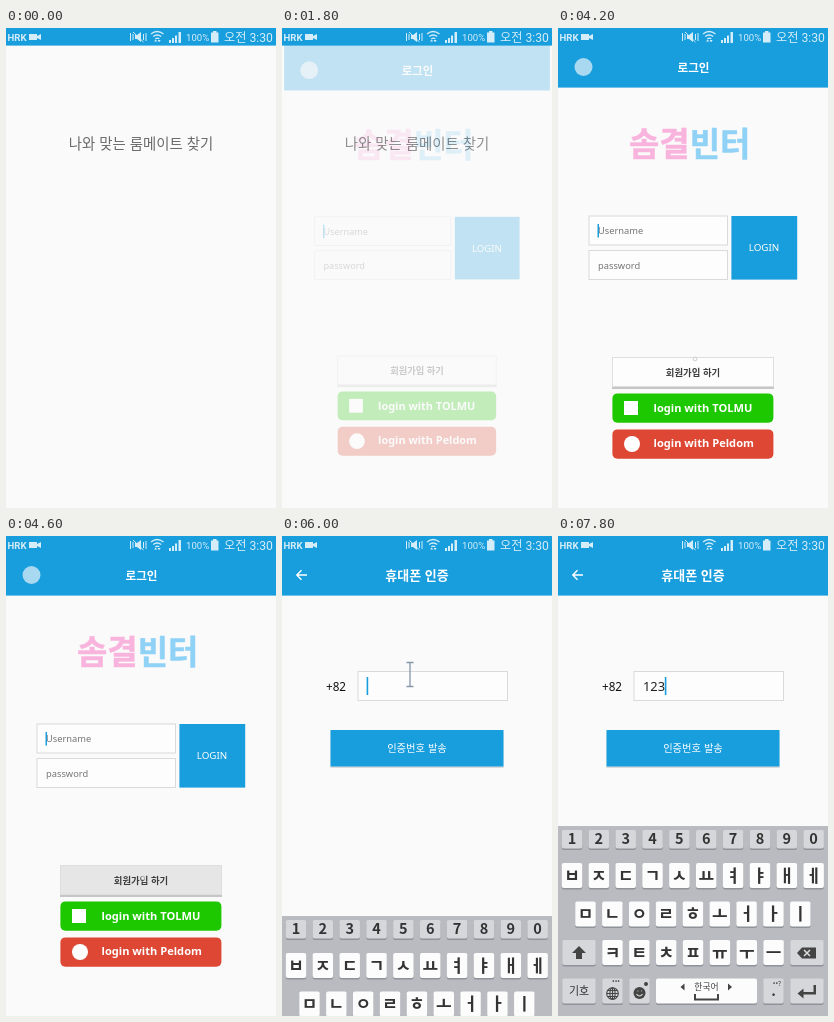
Write an HTML page that moves like this. It is 270 px wide and 480 px high and loops after 8000 ms.

```html
<!DOCTYPE html>
<html lang="ko">
<head>
<meta charset="utf-8">
<title>Login flow</title>
<style>
html, body { margin: 0; width: 100%; height: 100%; overflow: hidden; background: #fafafa; }
svg { display: block; width: 100vw; height: 100vh; }
text { font-family: "Noto Sans", "Noto Sans CJK KR", "Noto Sans CJK", sans-serif; }
.ko { font-family: "Noto Sans CJK KR", "Noto Sans CJK", sans-serif; }
.status text { font-family: Roboto, "Noto Sans CJK KR", "Noto Sans CJK", sans-serif; }
.mid { text-anchor: middle; }
.medium { font-weight: 500; }
.bold { font-weight: 700; }
.white { fill: #fff; }
.blue { fill: #189ddd; }
.hint { fill: #757575; font-size: 9.3px; }
.field { fill: #fdfdfd; stroke: #dadada; }
.mark { font-size: 33px; font-weight: 900; stroke-width: .5; stroke-linejoin: round; }
.line { fill: none; stroke: #fff; }
</style>
</head>
<body>
<svg viewBox="0 0 270 480" preserveAspectRatio="none">
  <rect width="270" height="480" fill="#fafafa"/>
  <text class="ko mid medium" x="135" y="120.5" font-size="14.4" fill="#6a6a6a">나와 맞는 룸메이트 찾기</text>

  <g id="login">
    <rect width="270" height="480" fill="#fafafa"/>
    <rect class="blue" width="270" height="59.6"/>
    <circle cx="25.5" cy="39" r="9" fill="#a9d8f1"/>
    <text class="ko mid bold white" x="135.5" y="43.5" font-size="11.6">로그인</text>
    <text class="ko mark" x="71" y="127.5" fill="#f9b4de" stroke="#f9b4de">솜결<tspan fill="#90d2f6" stroke="#90d2f6">빈터</tspan></text>
    <rect class="field" x="31" y="188" width="138.5" height="29"/>
    <rect class="field" x="31" y="222.5" width="138.5" height="29"/>
    <text class="hint" x="40" y="206.3">Username</text>
    <text class="hint" x="40" y="240.8">password</text>
    <rect id="loginCaret" class="blue" x="39.5" y="196" width="1.5" height="13.5"/>
    <rect class="blue" x="173.4" y="188" width="65.8" height="63.6"/>
    <text class="mid white" x="206" y="223.3" font-size="9.8">LOGIN</text>
    <rect x="54" y="357" width="162" height="4" fill="#c6c6c6"/>
    <rect id="signUp" x="54.5" y="329.5" width="161" height="29" fill="#fdfdfd" stroke="#dedede"/>
    <text class="ko mid bold" x="135" y="347.7" font-size="9.4" fill="#3c3c3c">회원가입 하기</text>
    <rect x="54.4" y="365.4" width="161" height="29.4" rx="5" fill="#1ec800"/>
    <rect class="white" x="66" y="373" width="14" height="14"/>
    <text class="bold white" x="95.5" y="383.8" font-size="11.1">login with TOLMU</text>
    <rect x="54.4" y="401.4" width="161" height="29.4" rx="5" fill="#dd4733"/>
    <circle class="white" cx="74" cy="416" r="8"/>
    <text class="bold white" x="95.5" y="419.3" font-size="11.1">login with Peldom</text>
  </g>

  <g id="phone">
    <rect width="270" height="480" fill="#fafafa"/>
    <rect class="blue" width="270" height="59.6"/>
    <path class="line" stroke-width="1.4" d="M25 39H15M19.5 34.3L14.8 39L19.5 43.7"/>
    <text class="ko mid bold white" x="135" y="44" font-size="13">휴대폰 인증</text>
    <text x="44" y="154.5" font-size="11.7" fill="#111">+82</text>
    <rect class="field" x="76" y="135.5" width="149.5" height="29"/>
    <text id="digits" x="85" y="155" font-size="12.9" fill="#222"></text>
    <rect id="phoneCaret" class="blue" y="141" width="1.6" height="18"/>
    <rect x="48.5" y="196" width="173" height="36" fill="#000" opacity=".13"/>
    <rect class="blue" x="48.5" y="194" width="173" height="36.5"/>
    <text class="ko mid medium white" x="135" y="216" font-size="10.3">인증번호 발송</text>
  </g>

  <g id="keyboard"></g>

  <rect class="blue" width="270" height="17.6"/>
  <g class="status" opacity=".82">
    <text class="bold white" x="1.5" y="12.6" font-size="9.6">HRK</text>
    <path class="white" d="M23 6h8v2l4-2v6l-4-2v2h-8z"/>
    <path class="line" d="M124.5 5v8M127 6v6M137.5 6v6M140 5v8M127 4l10.5 10"/>
    <path class="white" d="M129 7h2l4-3v10l-4-3h-2z"/>
    <path class="line" stroke-width="1.3" d="M145 6q6-5 12.5 0M147.2 8.5q4-3 8 0M149.3 10.8q2-1.5 4 0"/>
    <path class="white" d="M148 13.5l1.6-2 1.6 2zM151.5 12l1.6 2.2 1.6-2.2z"/>
    <path class="white" d="M163 12h2v3h-2zM166 10h2v5h-2zM169 7.5h2v7.5h-2zM172.5 4h2.5v11h-2.5z"/>
    <text class="white" x="180" y="12.7" font-size="9.6">100%</text>
    <path class="white" d="M205 4.5h2v-1.5h3.5v1.5h2v10h-7.5z"/>
    <text class="white" x="218" y="13.5" font-size="12.2">오전 3:30</text>
  </g>

  <circle id="dot" r="1.9" fill="#fff" fill-opacity=".7" stroke="#bbb" stroke-width=".7"/>
  <path id="beam" d="M124.5 126.5h7M124.5 150.5h7M128 126.5v24" fill="none" stroke="#8797aa" stroke-width="1.3"/>
</svg>
<script>
const $ = id => document.getElementById(id);
const show = (id, on) => $(id).setAttribute('display', on ? 'inline' : 'none');
const set = (id, attrs) => Object.entries(attrs).forEach(([k, v]) => $(id).setAttribute(k, v));

// Keyboard
const PITCH = 26.85, PALE = '#d5d7da', LIGHT = '#fcfcfc';

function key(cx, y, w, h, fill, label = '', size = 16, id = '') {
  const box = `x="${cx - w / 2}" width="${w}" height="${h}" rx="2"`;
  return `<rect ${box} y="${y + 1.5}" fill="#8f9299"/>
    <rect ${box} y="${y}" fill="${fill}" ${id && `id="${id}"`}/>
    <text class="ko mid" x="${cx}" y="${y + h / 2 + size * .36}" font-size="${size}"
      font-weight="${size > 12 ? 700 : 400}" fill="#333">${label}</text>`;
}
const row = (chars, x, y, h, fill, size, prefix) => [...chars].map((c, i) =>
  key(x + i * PITCH, y, 20.5, h, fill, c, size, prefix ? prefix + c : '')).join('');

$('keyboard').innerHTML = `
  <rect y="290" width="270" height="190" fill="#b9bbc1"/>
  ${row('1234567890', 14, 294, 18.5, PALE, 14.5, 'key')}
  ${row('ㅂㅈㄷㄱㅅㅛㅕㅑㅐㅔ', 14, 327, 25, LIGHT, 17)}
  ${row('ㅁㄴㅇㄹㅎㅗㅓㅏㅣ', 27.5, 365.5, 25, LIGHT, 17)}
  ${row('ㅋㅌㅊㅍㅠㅜㅡ', 54.5, 404, 25, LIGHT, 17)}
  ${key(21, 404, 33.5, 25, PALE)}
  ${key(249, 404, 33.5, 25, PALE)}
  ${key(21, 442.5, 33.5, 25, PALE, '기호', 11)}
  ${key(54.5, 442.5, 20.5, 25, PALE)}
  ${key(81.5, 442.5, 20.5, 25, PALE)}
  ${key(148.5, 442.5, 101, 25, LIGHT)}
  ${key(215.5, 442.5, 20.5, 25, PALE, '.', 14)}
  ${key(249, 442.5, 33.5, 25, PALE)}
  <g fill="#444">
    <path d="M21 410l7 7h-4v6h-6v-6h-4z"/>
    <path d="M239 417l5-5.5h14v11h-14z"/>
    <circle cx="81.5" cy="457" r="6"/>
    <path d="M122.5 451l4-3.5v7zM174 451l-4-3.5v7z"/>
    <path d="M239.5 457.5l6-5v3.5h10v-7h2.5v9.5h-12.5v4z"/>
    <text class="ko mid" x="148.5" y="454" font-size="8.8">한국어</text>
    <text class="mid" x="58" y="447.5" font-size="7">•••</text>
    <text class="mid" x="219" y="450" font-size="7">••?</text>
    <circle cx="88" cy="448" r="2"/>
  </g>
  <g fill="none" stroke="#444" stroke-width="1.1">
    <path d="M246 414l6 6M252 414l-6 6" stroke="#ddd" stroke-width="1.5"/>
    <circle cx="54.5" cy="457.5" r="5.8"/>
    <ellipse cx="54.5" cy="457.5" rx="2.6" ry="5.8"/>
    <path d="M49 457.5h11M50 454.5h9M50 460.5h9M54.5 452v11"/>
    <path d="M137 458v5.5h23v-5.5" stroke-width="2"/>
    <path d="M78.5 458q3 4 6 0M79.5 455h.8M83 455h.8" stroke="#ddd"/>
  </g>`;

// Motion
const STEP = 200, LOOP = 8000;
const between = (t, a, b) => t >= a && t < b;

const pointerPath = [
  [3200, 244, 391], [4200, 137, 331], [4400, 137, 342], [5200, 137, 342],
  [5800, 128, 138], [6000, 128, 138], [6200, 149, 233], [6800, 14, 306],
  [7200, 41, 306], [7600, 68, 306]
];

function pointerAt(t) {
  const i = pointerPath.findIndex(p => p[0] > t);
  if (i < 0) return pointerPath.at(-1).slice(1);
  if (i === 0) return pointerPath[0].slice(1);
  const [t0, x0, y0] = pointerPath[i - 1], [t1, x1, y1] = pointerPath[i];
  const k = (t - t0) / (t1 - t0);
  return [x0 + (x1 - x0) * k, y0 + (y1 - y0) * k];
}

// A screen opens by fading in while growing slightly about the centre.
function openScreen(id, t, start) {
  const p = Math.min(1, Math.max(0, .25 + (t - start) / STEP * .5));
  const s = .979 + .021 * p;
  show(id, t >= start);
  set(id, { opacity: p, transform: `translate(135 240) scale(${s}) translate(-135 -240)` });
}

function draw(t) {
  openScreen('login', t, 1800);
  openScreen('phone', t, 4800);
  show('loginCaret', !between(t, 3400, 3800));
  set('signUp', { fill: between(t, 4400, 4800) ? '#e6e6e6' : '#fdfdfd' });

  const typed = t < 6800 ? 0 : Math.min(3, 1 + Math.floor((t - 6800) / 400));
  $('digits').textContent = '123'.slice(0, typed);
  set('phoneCaret', { x: 84.6 + 7.4 * typed });
  show('phoneCaret', t >= 6000 && !between(t, 6600, 6800));
  for (const n of [1, 2, 3]) {
    const down = 6400 + n * 400;
    set('key' + n, { fill: between(t, down, down + STEP) ? '#a9cfe2' : PALE });
  }

  show('keyboard', t >= 6000);
  set('keyboard', { transform: `translate(0 ${t < 6200 ? 90 : 0})` });

  const [cx, cy] = pointerAt(t), beam = between(t, 5800, 6200);
  set('dot', { cx, cy });
  show('dot', between(t, 3200, 7800) && !beam);
  show('beam', beam);
}

function tick() {
  const t = performance.now() % LOOP;
  draw(Math.floor(t / STEP) * STEP);
  requestAnimationFrame(tick);
}
tick();
</script>
</body>
</html>
```
